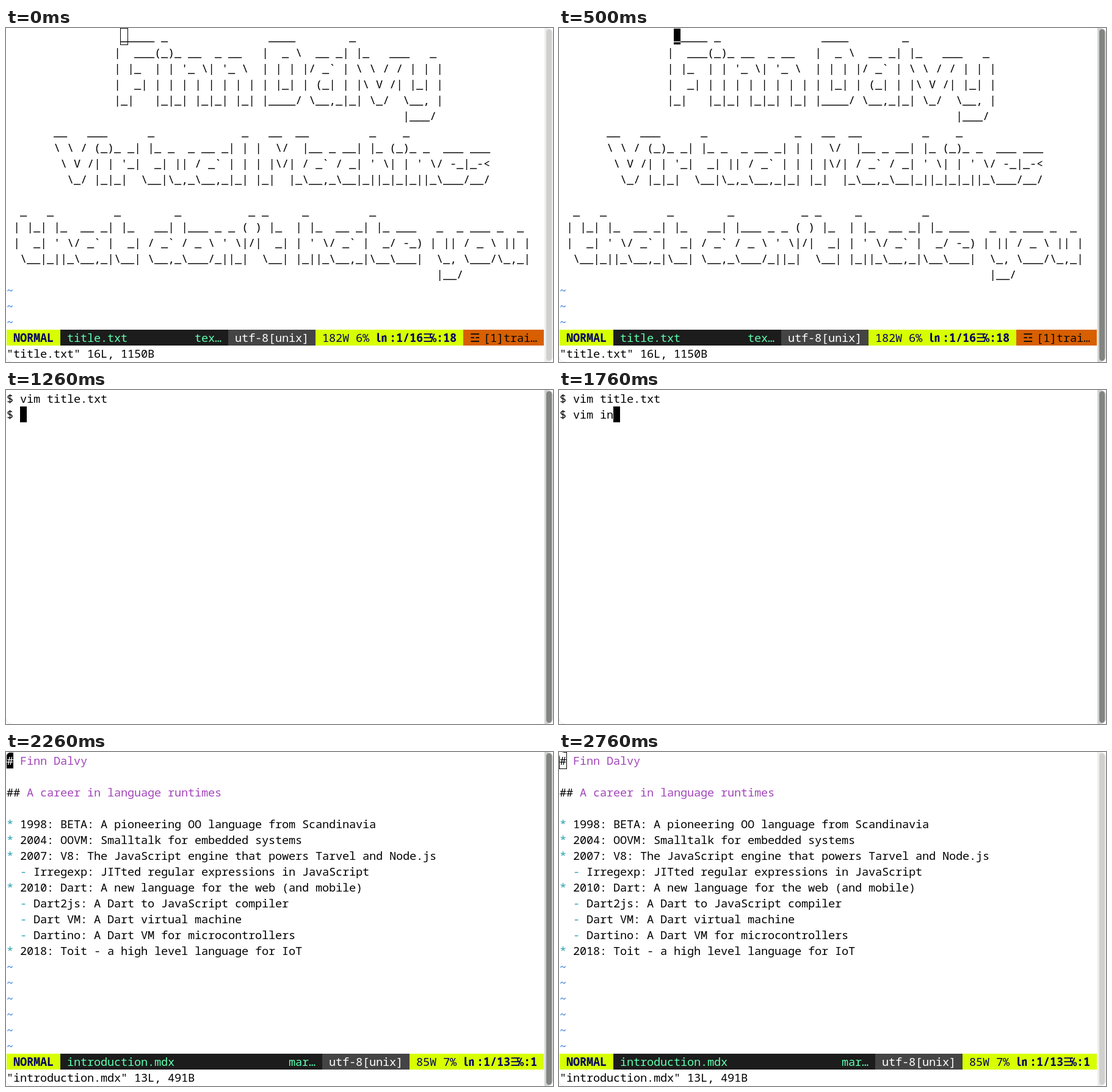
These frames come from a looping animation (896x548 px, 3.01 s). An HTML page with a canvas:

```html
<!DOCTYPE html>
<html lang="en">
<head>
<meta charset="utf-8">
<title>Terminal session</title>
<style>
html, body { margin: 0; width: 100%; height: 100%; overflow: hidden; background: #fff; }
canvas { display: block; }
</style>
</head>
<body>
<canvas id="stage" width="896" height="548"></canvas>
<script type="text/plain" id="banner">
                 _____ _               ____        _
                |  ___(_)_ __  _ __   |  _ \  __ _| |_   ___   _
                | |_  | | '_ \| '_ \  | | | |/ _` | \ \ / / | | |
                |  _| | | | | | | | | | |_| | (_| | |\ V /| |_| |
                |_|   |_|_| |_|_| |_| |____/ \__,_|_| \_/  \__, |
                                                           |___/
       __   ___      _             _   __  __         _    _
       \ \ / (_)_ _| |_ _  _ __ _| | |  \/  |__ _ __| |_ (_)_ _  ___ ___
        \ V /| | '_|  _| || / _` | | | |\/| / _` / _| ' \| | ' \/ -_|_-<
         \_/ |_|_|  \__|\_,_\__,_|_| |_|  |_\__,_\__|_||_|_|_||_\___/__/

  _   _         _        _          _ _     _         _
 | |_| |_  __ _| |_   __| |___ _ _ ( ) |_  | |_  __ _| |_ ___   _  _ ___ _  _
 |  _| ' \/ _` |  _| / _` / _ \ ' \|/|  _| | ' \/ _` |  _/ -_) | || / _ \ || |
  \__|_||_\__,_|\__| \__,_\___/_||_|  \__| |_||_\__,_|\__\___|  \_, \___/\_,_|
                                                                |__/
</script>
<script type="text/plain" id="notes">
# Finn Dalvy

## A career in language runtimes

* 1998: BETA: A pioneering OO language from Scandinavia
* 2004: OOVM: Smalltalk for embedded systems
* 2007: V8: The JavaScript engine that powers Tarvel and Node.js
  - Irregexp: JITted regular expressions in JavaScript
* 2010: Dart: A new language for the web (and mobile)
  - Dart2js: A Dart to JavaScript compiler
  - Dart VM: A Dart virtual machine
  - Dartino: A Dart VM for microcontrollers
* 2018: Toit - a high level language for IoT
</script>
<script>
const ctx = document.getElementById('stage').getContext('2d');
const CELL_W = 11, CELL_H = 26, ASCENT = 20, LOOP = 3010;
const FONT = '18.667px "Noto Sans Mono", "DejaVu Sans", "Noto Sans CJK JP", monospace';
const LIME = '#d7ff00', GREEN = '#00d700', NAVY = '#00005f', MINT = '#5fffaf';
const BLUE = '#2a7bde', PURPLE = '#a347ba', CYAN = '#2aa1b3';

const linesOf = id => document.getElementById(id).textContent.split('\n').slice(1, -1);
const banner = linesOf('banner'), notes = linesOf('notes');
const cellX = col => 1 + col * CELL_W;
const cellY = row => 1 + row * CELL_H;

// Writes text on the character grid; the ligature sign takes two cells.
function put(col, row, text, color = '#000', bold = false) {
  ctx.font = (bold ? '700 ' : '400 ') + FONT;
  ctx.fillStyle = color;
  for (const ch of text) {
    if (ch !== ' ') ctx.fillText(ch, cellX(col), cellY(row) + ASCENT);
    col += ch === '㏑' ? 2 : 1;
  }
}

function fillCells(col, row, count, color) {
  ctx.fillStyle = color;
  ctx.fillRect(cellX(col), cellY(row), count * CELL_W, CELL_H);
}

function cursor(col, row, ch = ' ', hollow = false) {
  if (hollow) {
    ctx.strokeStyle = '#000';
    ctx.lineWidth = 1;
    ctx.strokeRect(cellX(col) - .5, cellY(row) - .5, CELL_W + 1, CELL_H + 1);
  } else {
    fillCells(col, row, 1, '#000');
    put(col, row, ch, '#fff');
  }
}

function statusLine({ mode, file, type, encodingCol, words, place, warning }) {
  const accent = mode === 'COMMAND' ? GREEN : LIME;
  const modeWidth = mode.length + 2;
  const infoCol = encodingCol + 13;
  const placeCol = infoCol + words.length + 2;
  fillCells(0, 19, 80, '#1c1c1c');
  fillCells(0, 19, modeWidth, accent);
  put(1, 19, mode, NAVY, true);
  put(modeWidth + 1, 19, file, MINT);
  put(encodingCol - 5, 19, type, MINT);
  fillCells(encodingCol, 19, 13, '#444');
  put(encodingCol + 1, 19, 'utf-8[unix]', '#fff');
  fillCells(infoCol, 19, 80 - infoCol, accent);
  put(infoCol + 1, 19, words, NAVY);
  put(placeCol, 19, place, NAVY, true);
  if (warning) {
    fillCells(68, 19, 12, '#d75f00');
    put(69, 19, warning, '#080808');
  }
}

function tildes(from) {
  for (let row = from; row < 19; row++) put(0, row, '~', BLUE);
}

function titleView(mode, message) {
  banner.forEach((line, row) => put(0, row, line));
  tildes(16);
  statusLine({
    mode, file: 'title.txt', type: 'tex…', encodingCol: 33,
    words: '182W 6%', place: '㏑:1/16☰℅:18', warning: '☲ [1]trai…'
  });
  put(0, 20, message);
}

function notesView(hollow) {
  notes.forEach((line, row) => {
    const [, mark, rest] = line.match(/^(#+|\s*[*-]|)(.*)$/);
    const heading = mark.startsWith('#');
    put(0, row, mark, heading ? '#000' : CYAN);
    put(mark.length, row, rest, heading ? PURPLE : '#000');
  });
  tildes(13);
  statusLine({
    mode: 'NORMAL', file: 'introduction.mdx', type: 'mar…', encodingCol: 47,
    words: '85W 7%', place: '㏑:1/13☰℅:1'
  });
  put(0, 20, '"introduction.mdx" 13L, 491B');
  cursor(0, 0, '#', hollow);
}

function titleNormal(hollow) {
  titleView('NORMAL', '"title.txt" 16L, 1150B');
  cursor(17, 0, '_', hollow);
}

function titleCommand(key) {
  titleView('COMMAND', ':' + key);
  cursor(1, 20, key || ' ');
}

function shell(typed) {
  put(0, 0, '$ vim title.txt');
  put(0, 1, '$ ' + typed);
  cursor(2 + typed.length, 1);
}

const BLURRED = ['#ededec', '#d0d0cf'];
const FADING = ['#d6d8d6', '#989a97'];
const FOCUSED = ['#d0d3d1', '#828581'];

function windowFrame([trough, slider]) {
  ctx.fillStyle = trough;
  ctx.fillRect(882, 0, 14, 548);
  ctx.fillStyle = slider;
  ctx.beginPath();
  ctx.roundRect(885, 2, 9, 544, 4.5);
  ctx.fill();

  // Rounded window corners
  ctx.fillStyle = '#fff';
  ctx.beginPath();
  ctx.rect(0, 0, 896, 548);
  ctx.roundRect(0, 0, 896, 548, 9);
  ctx.fill('evenodd');
  ctx.strokeStyle = '#e6e6e6';
  ctx.lineWidth = 1;
  ctx.beginPath();
  ctx.arc(9, 539, 9, Math.PI / 2, Math.PI);
  ctx.stroke();
}

// Start time in ms, scroll bar colours, picture
const scenes = [
  [0, BLURRED, () => titleNormal(true)],
  [250, FADING, () => titleNormal(false)],
  [500, FOCUSED, () => titleNormal(false)],
  [760, FOCUSED, () => titleCommand('')],
  [1010, FOCUSED, () => titleCommand('q')],
  [1260, FOCUSED, () => shell('')],
  [1510, FOCUSED, () => shell('vim')],
  [1760, FOCUSED, () => shell('vim in')],
  [2010, FOCUSED, () => shell('vim introduction.mdx ')],
  [2260, FOCUSED, () => notesView(false)],
  [2510, FADING, () => notesView(true)],
  [2760, BLURRED, () => notesView(true)]
];

function render() {
  const time = performance.now() % LOOP;
  const [, bar, draw] = scenes.findLast(([start]) => start <= time);
  ctx.fillStyle = '#fff';
  ctx.fillRect(0, 0, 896, 548);
  draw();
  windowFrame(bar);
  requestAnimationFrame(render);
}
render();
</script>
</body>
</html>
```
